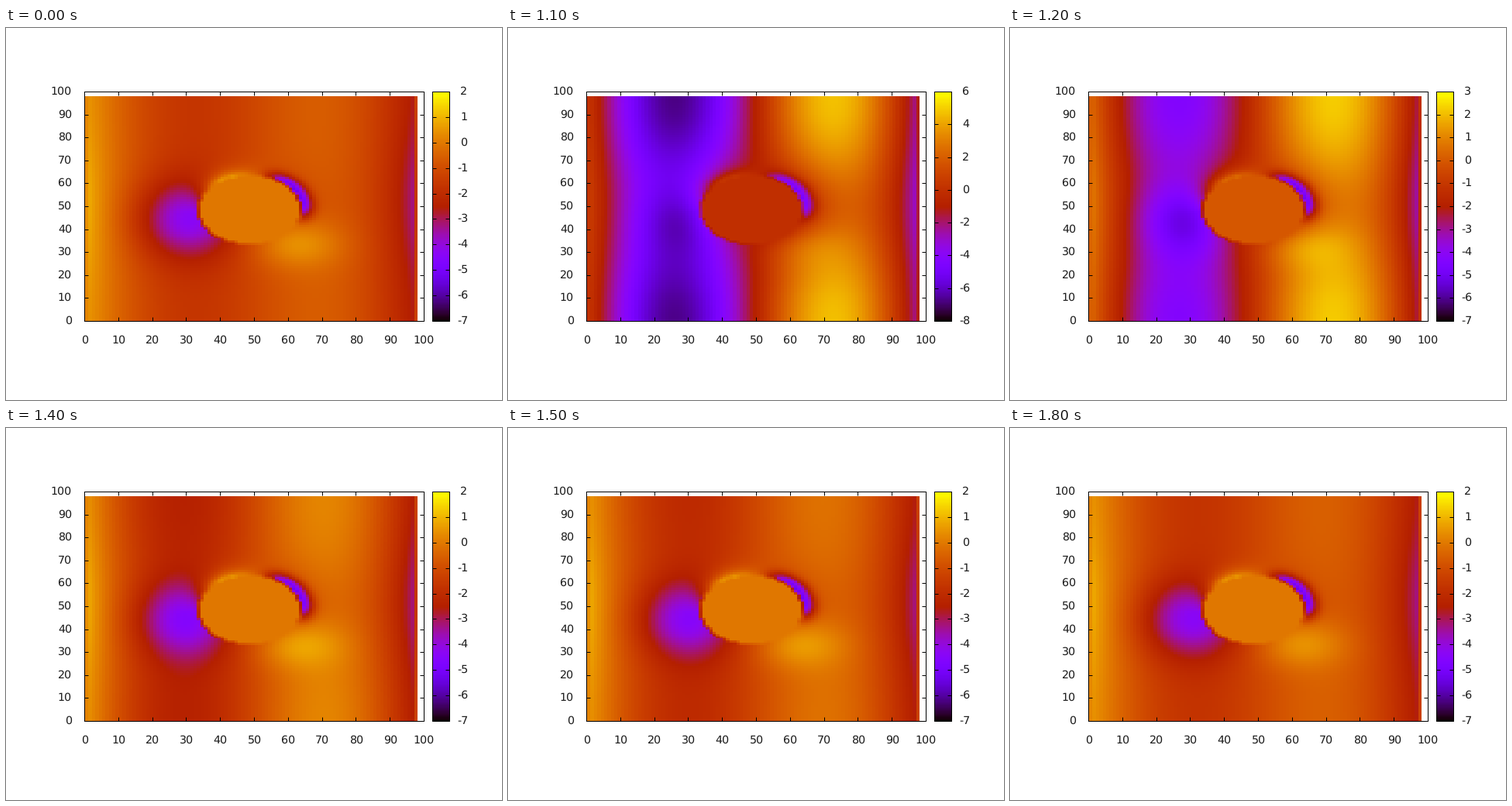
Recreate the animation shown at these times as a matplotlib script. Size 640 px wide and 480 px high, loop 5.9 s.

```python
import numpy as np
import matplotlib.pyplot as plt
from matplotlib.animation import FuncAnimation
from matplotlib.collections import LineCollection
from matplotlib.patches import Rectangle

W, H, DPI = 640, 480, 100
LEFT, RIGHT, TOP, BOTTOM = 101.5, 539.5, 82.5, 378.5
BAR_L, BAR_R = 550.5, 572.5
FONT = dict(family="DejaVu Sans", size=14.2 * 72 / DPI, color="0.1")
N = 99          # grid points per side
MID = 48.5      # centre of the cylinder
RADIUS = 15
plt.rcParams["text.hinting"] = "none"


def palette(t):
    """Black, violet, red, yellow colour ramp."""
    t = np.clip(t, 0, 1)
    rgb = [np.sqrt(t), t ** 3, np.sin(2 * np.pi * t)]
    return np.clip(np.stack(rgb, axis=-1), 0, 1)


Y, X = np.mgrid[0:N, 0:N].astype(float)
R = np.hypot(X - MID, Y - MID)
ANGLE = np.degrees(np.arctan2(Y - MID, X - MID))
SOLID = R < RADIUS


def bump(v, centre, width, power=2):
    return np.exp(-np.abs((v - centre) / width) ** power)


def spot(cx, cy, sx, sy):
    return bump(X, cx, sx) * bump(Y, cy, sy)


def clear_walls(f):
    f[SOLID] = 0
    f[:, [0, -1]] = 0
    return f


def steady_field():
    px = [1, 10, 20, 33, 50, 64, 78, 88, 94, 97]
    pv = [0.45, -0.4, -1.25, -1.7, -1.05, -0.65, -0.85, -1.55, -2.25, -2.6]
    f = np.polynomial.Polynomial.fit(px, pv, 5)(X)
    f += 0.55 * np.exp(-X / 6) * bump(Y, 50, 30)
    f -= 0.75 * np.exp((X - 97) / 6) * bump(Y, 52, 30)
    f -= 2.75 * spot(30.5, 44.5, 14.5, 16.5)
    f += 1.1 * spot(61.5, 33, 13.5, 10)
    depth = np.maximum(R - RADIUS, 0)
    f += 3.3 * bump(ANGLE, 122, 36) * np.exp(-depth / 3)
    wake = bump(ANGLE, 28, 40, 4)
    f -= wake * (4.1 * bump(R, 15.7, 3) + 0.7 * np.exp(-depth / 6))
    return clear_walls(f)


def wave_field():
    """Slowest antisymmetric diffusion mode around the cylinder."""
    f = -np.sin(2 * np.pi * X / (N - 1))
    for _ in range(1500):
        p = np.pad(f, 1, mode="edge")
        f = clear_walls((p[:-2, 1:-1] + p[2:, 1:-1]
                         + p[1:-1, :-2] + p[1:-1, 2:]) / 4)
    return f / np.abs(f).max()


STEADY, WAVE = steady_field(), wave_field()


def cells(f):
    return (f[1:, 1:] + f[1:, :-1] + f[:-1, 1:] + f[:-1, :-1]) / 4


def scale(n):
    """Low end, high end and tick step of the colour scale."""
    return {10: (-15, 10, 5), 11: (-8, 6, 2), 12: (-7, 3, 1)}.get(n, (-7, 2, 1))


fig = plt.figure(figsize=(W / DPI, H / DPI), dpi=DPI, facecolor="white")
ax = fig.add_axes([0, 0, 1, 1])
ax.axis("off")


def picture(data, x0, x1, y0, y1):
    return ax.imshow(data, origin="lower", aspect="auto", zorder=1,
                     interpolation="nearest", extent=(x0, x1, y0, y1))


heat = picture(np.zeros((N - 1, N - 1, 3)), 102, 531, 378, 88)
picture(palette(np.linspace(0, 1, 256))[:, None], 551, 572, 378, 83)
ax.set_xlim(0, W)
ax.set_ylim(H, 0)


def crisp(v):
    """Centre of the pixel that holds v."""
    return np.floor(v) + 0.5


def box(x0, x1):
    ax.add_patch(Rectangle((x0, TOP), x1 - x0, BOTTOM - TOP, fill=False,
                           ec="black", lw=0.72, zorder=3, snap=False))


def side_ticks(y, x0, x1):
    y = crisp(y)
    return [[(x0, y), (x0 + 5, y)], [(x1 - 5, y), (x1, y)]]


def tick_lines(segments):
    lines = LineCollection(segments, colors="black", linewidths=0.72, zorder=3)
    lines.set_snap(False)
    ax.add_collection(lines, autolim=False)
    return lines


box(LEFT, RIGHT)
box(BAR_L, BAR_R)
marks = []
for v in range(0, 101, 10):
    x = LEFT + v * (RIGHT - LEFT) / 100
    y = BOTTOM - v * (BOTTOM - TOP) / 100
    marks += side_ticks(y, LEFT, RIGHT)
    marks += [[(crisp(x), a), (crisp(x), a + 5)] for a in (TOP, BOTTOM - 5)]
    ax.text(x, 407, str(v), ha="center", va="baseline", **FONT)
    ax.text(85, crisp(y) + 3.5, str(v), ha="right", va="baseline", **FONT)
tick_lines(marks)

bar_ticks = tick_lines([])
bar_labels = [ax.text(0, 0, "", va="baseline", **FONT) for _ in range(11)]


def draw(n):
    low, high, step = scale(n)
    swing = 10 * 0.54 ** (min(n, 18) - 10) if n >= 10 else 0
    heat.set_data(palette((cells(STEADY + swing * WAVE) - low) / (high - low)))

    segments = []
    values = list(range(low, high + 1, step))
    for i, label in enumerate(bar_labels):
        label.set_visible(i < len(values))
        if i < len(values):
            v = values[i]
            y = BOTTOM - (v - low) / (high - low) * (BOTTOM - TOP)
            segments += side_ticks(y, BAR_L, BAR_R)
            label.set_text(str(v))
            label.set_position((582 if v < 0 else 586, crisp(y) + 3.5))
    bar_ticks.set_segments(segments)
    return [heat, bar_ticks, *bar_labels]


anim = FuncAnimation(fig, draw, frames=59, interval=100, repeat=True,
                     repeat_delay=0, blit=False)
plt.show()
```
